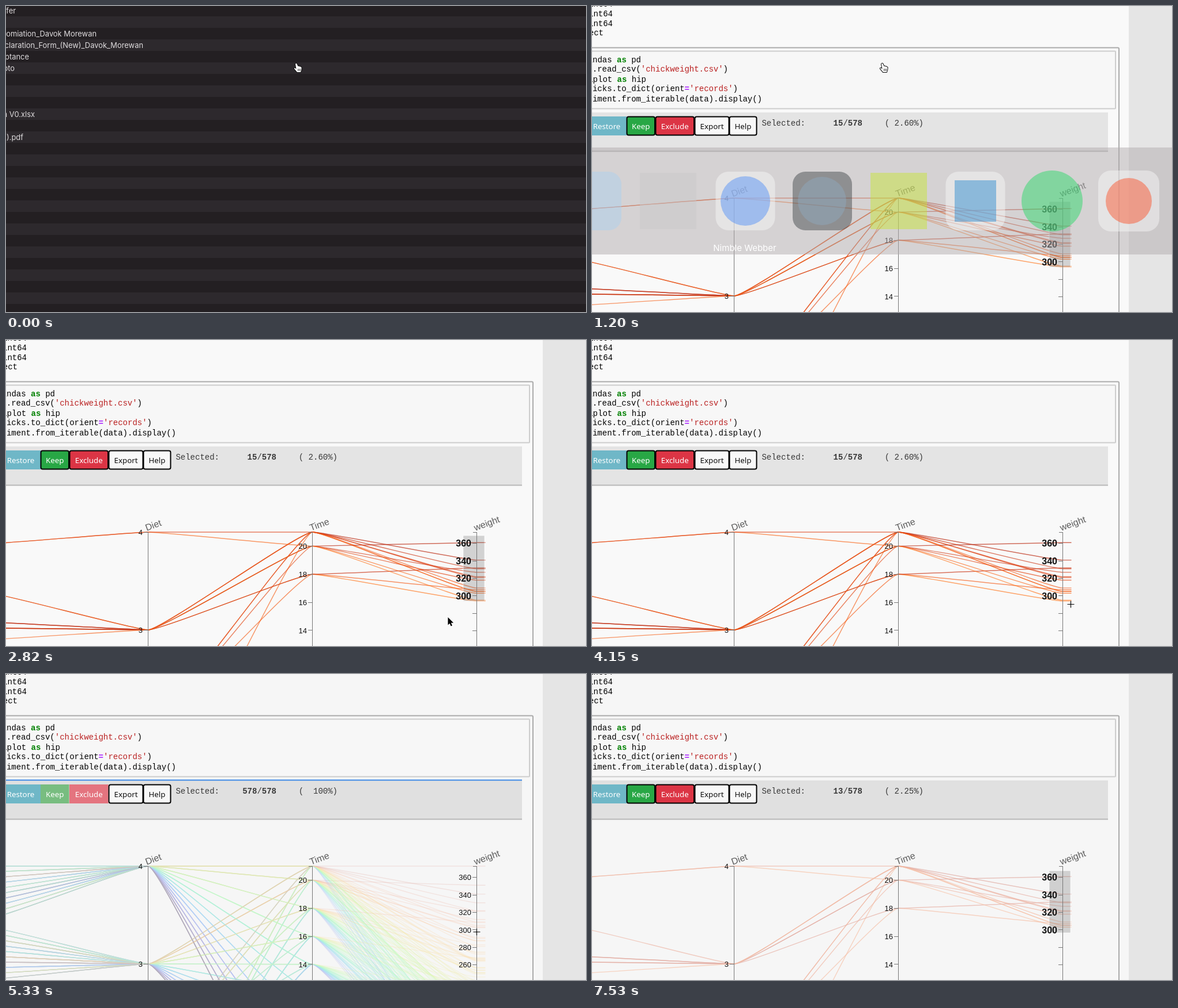
These frames come from a looping animation (1006 px wide and 532 px high, 8.58 s). An HTML page with a canvas:

```html
<!DOCTYPE html>
<html lang="en">
<head>
<meta charset="utf-8">
<title>Brushing a parallel plot</title>
<style>
html, body { margin: 0; width: 1006px; height: 532px; overflow: hidden; }
canvas { display: block; }
</style>
</head>
<body>
<canvas id="stage" width="1006" height="532"></canvas>
<script>
const W = 1006, H = 532, LOOP = 8580, STEP = 147.3;
const ctx = document.getElementById('stage').getContext('2d');
const layer = Object.assign(document.createElement('canvas'), { width: W, height: H });
const pen = layer.getContext('2d');
const UI = 'Inter, sans-serif', SANS = '"Liberation Sans", Arial, sans-serif';
const MONO = '14px "Liberation Mono", monospace', BUTTON = '13.3px "Noto Sans", sans-serif';

// ---------- drawing helpers ----------
function rect(x, y, w, h, fill) {
  ctx.fillStyle = fill;
  ctx.fillRect(x, y, w, h);
}
function box(x, y, w, h, r, fill, stroke, width = 2) {
  ctx.beginPath();
  ctx.roundRect(x, y, w, h, r);
  if (fill) { ctx.fillStyle = fill; ctx.fill(); }
  if (stroke) { ctx.strokeStyle = stroke; ctx.lineWidth = width; ctx.stroke(); }
}
function disc(x, y, r, fill) {
  ctx.beginPath();
  ctx.arc(x, y, r, 0, 7);
  ctx.fillStyle = fill;
  ctx.fill();
}
function text(s, x, y, font, fill, align = 'left') {
  ctx.font = font;
  ctx.fillStyle = fill;
  ctx.textAlign = align;
  ctx.fillText(s, x, y);
}
// Coloured code segments whose last character ends at x = end.
function code(end, y, ...parts) {
  for (const [s, fill = '#000', bold] of parts.reverse()) {
    text(s, end, y, (bold ? 'bold ' : '') + MONO, fill, 'right');
    end -= ctx.measureText(s).width;
  }
}

// ---------- chick data ----------
const finals = [205, 215, 202, 157, 223, 157, 305, 130, 98, 124, 175, 205, 96, 266, 80, 60, 142, 30, 157, 117,
  331, 167, 175, 74, 265, 251, 192, 233, 309, 150, 256, 305, 147, 341, 373, 220, 178, 290, 272, 321,
  204, 281, 200, 215, 196, 238, 205, 322, 237, 264];
const lastTime = { 8: 20, 15: 14, 16: 12, 18: 2, 44: 18 };
const times = [0, 2, 4, 6, 8, 10, 12, 14, 16, 18, 20, 21];
const grown = finals.flatMap((end, i) => times
  .filter(t => t <= (lastTime[i + 1] ?? 21))
  .map(t => [i + 1, t, 41 + (end - 41) * (t / 21) ** 1.4]));
const all = grown.map((_, i) => grown[i * 211 % grown.length]);
const heavy = [[7, 21, 305], [21, 18, 307], [21, 20, 318], [21, 21, 331], [29, 21, 309],
  [34, 18, 294], [34, 20, 327], [34, 21, 341], [35, 18, 332], [35, 20, 361],
  [40, 20, 295], [40, 21, 321], [48, 20, 303], [48, 21, 322], [32, 21, 305]];

const dietOf = chick => chick <= 20 ? 1 : Math.ceil(chick / 10) - 1;
const chickY = c => 334 + (50 - c) * 510 / 49;
const dietY = d => 334 + (4 - d) * 170;
const timeY = t => 334 + (21 - t) * 24.4;
const weightY = w => 334 + (373 - w) * 1.518;

function turbo(t) {
  const r = 34.61 + t * (1172.33 - t * (10793.56 - t * (33300.12 - t * (38394.49 - t * 14825.05))));
  const g = 23.31 + t * (557.33 + t * (1225.33 - t * (3574.96 - t * (1073.77 + t * 707.56))));
  const b = 27.2 + t * (3211.1 - t * (15327.97 - t * (27814 - t * (22569.18 - t * 6838.66))));
  return `rgb(${[r, g, b].map(v => Math.max(0, Math.min(255, Math.round(v))))})`;
}

let drawnKey = '';
function renderLines(rows, alpha, key) {
  if (key === drawnKey) return;
  drawnKey = key;
  pen.clearRect(0, 0, W, H);
  pen.globalAlpha = alpha;
  pen.lineWidth = 1.4;
  for (const [chick, time, weight] of rows) {
    let x = -38.5, y = chickY(chick);
    pen.strokeStyle = turbo(Math.max(0, Math.min(0.9, (weight - 35) / 338)));
    pen.beginPath();
    pen.moveTo(x, y);
    for (const next of [dietY(dietOf(chick)), timeY(time), weightY(weight)]) {
      pen.bezierCurveTo(x + 24, y, x + 261, next, x + 285, next);
      x += 285;
      y = next;
    }
    pen.lineTo(x + 15, y);
    pen.stroke();
  }
}

// ---------- scenes ----------
function fileList() {
  rect(0, 0, W, H, '#231f22');
  for (let y = 18; y < H; y += 40) rect(0, y, W, 20, '#2d292d');
  const names = [[17, 8, 'Offer'], [157, 48, 'Nomiation_Davok Morewan'],
    [238, 68, 'Declaration_Form_(New)_Davok_Morewan'], [40, 88, 'Acceptance'],
    [15, 108, 'Photo'], [50, 188, 'Plan V0.xlsx'], [30, 228, '(1).pdf']];
  for (const [end, y, name] of names) text(name, end, y + 4.5, '12.9px ' + UI, '#dfdcde', 'right');
}

function switcher(fading) {
  rect(0, 246, W, 186, fading ? 'rgba(178,172,174,.5)' : '#2e272b');
  if (!fading) box(198, 271, 136, 136, 10, '#0f0d0f');
  ctx.globalAlpha = fading ? 0.45 : 1;
  box(-51, 288, 102, 102, 22, '#a9cff0');
  rect(83, 290, 98, 98, '#c8c5c8');
  box(214.5, 288, 103, 102, 22, '#f8f8f8');
  disc(266, 339, 43, '#4b8bf5');
  box(348, 288, 103, 102, 22, '#383c40');
  disc(399, 339, 42, '#8fa9be');
  rect(483, 290, 98, 98, '#c6e52c');
  box(613.5, 288, 103, 102, 22, '#f8f8f8');
  rect(629, 303, 72, 72, '#1f83cc');
  disc(798, 339, 53, '#1ed760');
  box(878, 286, 106, 106, 22, '#f8f8f8');
  disc(931, 339, 40, '#fb4b1f');
  ctx.globalAlpha = 1;
  text('Nimble Webber', 265, 426, '15px ' + UI, fading ? '#fff' : '#9b969a', 'center');
}

function button(label, x, w, fill, color, border) {
  if (border) box(x + 0.5, 192.5, w - 1, 32, 3, fill, '#000');
  else rect(x, 192, w, 33, fill);
  text(label, x + w / 2, 213.5, BUTTON, color, 'center');
}

function notebook(full, paper, band) {
  rect(0, 0, W, H, paper);
  rect(931, 0, 75, H, '#e5e5e5');
  box(-20, 72.5, 934, 500, 2, null, '#ababab');
  box(-20, 78.5, 928, 100, 1, '#f7f7f7', '#cdcdcd');

  const as = [' as ', '#008000', true], str = '#ba2121';
  code(36, 1, ['int64']);
  code(36, 18, ['int64']);
  code(36, 35, ['int64']);
  code(20, 51, ['dtype: object']);
  code(85, 97.5, ['pandas'], as, ['pd']);
  code(236, 114, ['pd.read_csv('], ["'chickweight.csv'", str], [')']);
  code(94, 131.5, ['hiplot'], as, ['hip']);
  code(253, 148, ['chicks.to_dict(orient'], ['=', '#aa22ff', true], ["'records'", str], [')']);
  code(295, 165.5, ['hip.Experiment.from_iterable(data).display()']);

  rect(0, 185, 895, 67, band);
  rect(0, 251.5, 895, 2, '#b8b8b8');
  button('Restore', -9, 69, '#6fb7c7', '#fff');
  button('Keep', 60, 49.5, full ? '#78bd80' : '#28a745', '#fff', !full);
  button('Exclude', 110, 67.5, full ? '#e4747f' : '#dc3545', '#fff', !full);
  button('Export', 178, 60, '#f8f8f8', '#111', true);
  button('Help', 238, 48, '#f8f8f8', '#111', true);
}

function counter(n) {
  const pct = n === 578 ? '100' : (n / 5.78).toFixed(2), ink = '#383838';
  code(370, 208, ['Selected:', ink]);
  code(469, 208, [String(n), ink, true], ['/', ink], ['578', ink, true]);
  code(575, 208, [`(${pct.padStart(5)}%)`, ink]);
}

function axis(x, title, values, toY, range) {
  rect(x, 334, 1, H, '#777');
  rect(x - 6, 334, 6, 1, '#777');
  for (const v of values) {
    const y = toY(v), inside = range && y >= range[0] && y <= range[1];
    rect(x - 7, Math.round(y - 0.5), 7, 1, '#777');
    if (range && !inside) continue;
    const font = (inside ? 'bold 16px ' : '13px ') + SANS;
    text(v, x - 9, y + (inside ? 5.7 : 4.7), font, '#111', 'right');
  }
  ctx.save();
  ctx.translate(x - 2, 332);
  ctx.rotate(-0.35);
  text(title, 0, 0, '16px ' + SANS, '#5c5c5c');
  ctx.restore();
}

// ---------- pointer ----------
const shapes = {
  hand: 'M-3-6Q-2-8-.5-6.5L1.5-2Q3-3 4-1.5 5.5-2.5 6.5-.8 8-1 7.5 1.5L7 5 6 8H0L-5 2Q-5.5 0-3.5 1L-1.5 2.5Z',
  arrow: 'M0 0V13.5L3.1 10.7 5.2 15.6 7.5 14.6 5.4 9.8H9.7Z',
  cross: 'M-6 0H6M0-6V6',
  beam: 'M-3-7.5Q0-7.5 0-6 0-7.5 3-7.5M0-6V6M-3 7.5Q0 7.5 0 6 0 7.5 3 7.5',
  resize: 'M0-8L4-3H1V3H4L0 8-4 3H-1V-3H-4Z'
};
for (const k in shapes) shapes[k] = new Path2D(shapes[k]);

const pointerKeys = [
  [0, 'hand', 505, 107], [1640, 'beam', 509, 100], [1787, 'beam', 514, 124], [1934, 'arrow', 518, 188],
  [2081, 'arrow', 574, 234], [2228, 'arrow', 714, 274], [2376, 'arrow', 777, 298], [2523, 'arrow', 785, 430],
  [2670, 'arrow', 786, 496], [2820, 'arrow', 766.5, 482], [2967, 'arrow', 772, 472], [3115, 'arrow', 780, 456],
  [3262, 'arrow', 783, 444], [3410, 'arrow', 769, 456], [3710, 'cross', 800.5, 467.5], [3850, 'cross', 830.5, 459.5],
  [4740, 'cross', 823.5, 453.5], [5180, 'cross', 816.5, 448.5]];

function pointer(t, brushEnd) {
  if (t >= 7530) return;
  let [, kind, x, y] = pointerKeys.findLast(k => k[0] <= t);
  if (t >= 7240) [kind, x, y] = ['resize', 819, 451];
  else if (t >= 6500) y = Math.round(brushEnd) + 0.5;
  else if (t >= 5330) y = Math.round(448 - 106 * Math.min(1, Math.floor((t - 5330) / STEP) / 7)) + 0.5;
  const thin = kind === 'cross' || kind === 'beam';
  ctx.save();
  ctx.translate(x, y);
  ctx.lineJoin = 'round';
  ctx.lineWidth = thin ? 3 : 2;
  ctx.strokeStyle = kind === 'hand' ? '#111' : thin ? 'rgba(255,255,255,.7)' : '#fff';
  ctx.stroke(shapes[kind]);
  if (thin) {
    ctx.lineWidth = 1.2;
    ctx.strokeStyle = '#000';
    ctx.stroke(shapes[kind]);
  } else {
    ctx.fillStyle = kind === 'hand' ? '#fff' : '#000';
    ctx.fill(shapes[kind]);
  }
  if (kind === 'hand') for (const dx of [1, 3, 5]) rect(dx, 2, 0.8, 4, '#222');
  ctx.restore();
}

// ---------- timeline ----------
function plot(t) {
  const full = t >= 4300 && t < 6500, dragging = t >= 6500;
  const step = Math.floor((t - 4300) / STEP + 0.05);
  const dragged = Math.min(1, (Math.floor((t - 6500) / 148) + 1) / 6);
  const range = dragging ? [342, 342 + 108 * dragged] : [340, 454];
  const rows = full ? all.slice(0, all.length * Math.min(1, 0.25 + 0.1 * step))
    : dragging ? heavy.filter(r => weightY(r[2]) < range[1]) : heavy;

  notebook(full, t < 4300 ? '#f9f9f9' : '#f6f6f6', t < 4300 ? '#e4e4e4' : '#e0e0e0');
  counter(full ? all.length : rows.length);
  if (full) rect(0, 183.5, 895 * Math.min(1, (step + 1) / 7), 2, '#3f8ae8');

  renderLines(rows, full ? 0.27 : 0.66, `${full}${rows.length}`);
  ctx.globalAlpha = t < 4300 ? 1 : 0.36;
  ctx.drawImage(layer, 0, 0);
  ctx.globalAlpha = 1;

  if (t < 4150 || dragging) box(793, range[0], 37, range[1] - range[0], 0, 'rgba(119,119,119,.3)', 'rgba(255,255,255,.6)', 1);
  axis(246, 'Diet', [4, 3], dietY);
  axis(531, 'Time', [20, 18, 16, 14], timeY);
  axis(816, 'weight', [360, 340, 320, 300, 280, 260, 240], weightY, full ? null : range);
  if (t < 1350) switcher(true);
  pointer(t, range[1]);
}

function frame(now) {
  const t = now % LOOP;
  if (t < 1200) {
    fileList();
    if (t >= 150) switcher(false);
    pointer(t);
  } else plot(t);
  requestAnimationFrame(frame);
}
frame(0);
</script>
</body>
</html>
```
